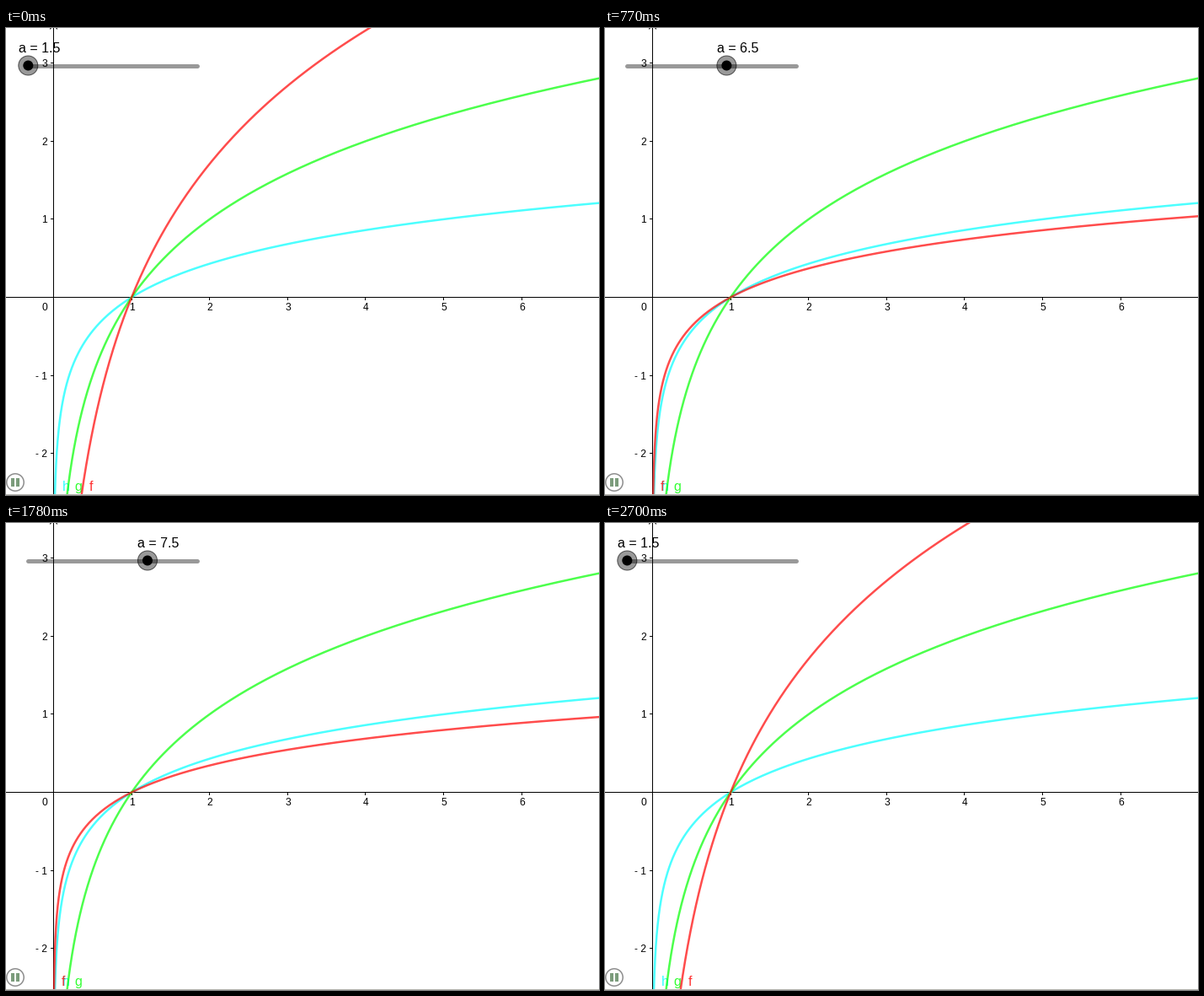
Write a matplotlib script that moves like this. It is 704 px wide and 554 px high and loops after 2.77 s.

```python
import numpy as np
import matplotlib.pyplot as plt
from matplotlib.animation import FuncAnimation
from matplotlib.patches import Circle, Rectangle

W, H, DPI = 704, 554, 64
PT = 72 / DPI               # points per pixel
X0, Y0, UNIT = 56.5, 319.5, 92.6
LOOP, TICK = 2770, 10       # milliseconds
STEPS, STEP_MS, DOWN_AT = 17, 77, 1470
A_MIN, A_STEP = 1.5, 0.5
RAIL_L, RAIL_R, RAIL_Y = 26.3, 227, 44.5

plt.rcParams["font.family"] = "Liberation Sans"
fig = plt.figure(figsize=(W / DPI, H / DPI), dpi=DPI, facecolor="white")
ax = fig.add_axes([0, 0, 1, 1])
ax.set_xlim(0, W)
ax.set_ylim(H, 0)
ax.axis("off")


def rect(x, y, w, h, color="black", z=1):
    ax.add_patch(Rectangle((x, y), w, h, fc=color, lw=0, aa=False, zorder=z))


def label(x, y, s, size, color="black", ha="left", z=2, alpha=1):
    return ax.text(x, y, s, size=size * PT, color=color, ha=ha,
                   va="baseline", zorder=z, alpha=alpha)


def log_curve(a):
    """Pixel points of y = log_a(x), sampled along y."""
    top = min(3.6, np.log(7.1) / np.log(a))
    y = np.linspace(-2.65, top, 240)
    return X0 + UNIT * a ** y, Y0 - UNIT * y


def name_x(a):
    """Left end of a curve's name, beside its lowest visible point."""
    return X0 + UNIT * a ** ((Y0 - 553) / UNIT) + 8.8


def draw_axes():
    rect(56, 0, 1, H)
    rect(0, 319, W, 1)
    ax.plot([52.5, 56.5, 60.5], [1, -4, 1], color="black", lw=PT, zorder=1)
    for n in range(1, 7):
        x = X0 + n * UNIT
        rect(int(x), 320, 1, 3)
        label(x + 0.5, 335, str(n), 12, ha="center")
    for n in (-2, -1, 1, 2, 3):
        y = Y0 - n * UNIT
        rect(53, int(y), 3, 1)
        label(49, int(y) + 4.8, str(n) if n > 0 else f"- {-n}", 12, ha="right")
    label(49, 335, "0", 12, ha="right")
    rect(0, 553, W, 1, "#b4b4ae", z=6)


def draw_pause():
    ax.add_patch(Circle((11, 539), 10.2, fc="white", ec="#8c8c8c",
                        lw=1.5 * PT, zorder=6))
    for x in (6, 12):
        rect(x, 534, 4, 10, "#7c9c7c", z=7)


def add_curve(a, name, color, z):
    line, = ax.plot(*log_curve(a), color=color, alpha=0.7, lw=2.5 * PT,
                    zorder=z)
    text = label(name_x(a), 549, name, 16, color, z=z + 0.5, alpha=0.8)
    return line, text


draw_axes()
draw_pause()
add_curve(5, "h", "#00ffff", 3)
add_curve(2, "g", "#00ff00", 4)
f_line, f_name = add_curve(A_MIN, "f", "#ff0000", 5)

ax.plot([RAIL_L, RAIL_R], [RAIL_Y] * 2, color="black", alpha=0.4, lw=5 * PT,
        solid_capstyle="round", zorder=8)
knob = ax.add_patch(Circle((0, RAIL_Y), 11.5, fc=(0, 0, 0, 0.4),
                           ec=(0, 0, 0, 0.6), lw=PT, zorder=9))
dot = ax.add_patch(Circle((0, RAIL_Y), 6, fc="black", lw=0, zorder=10))
value = label(0, 29, "", 16, z=10)


def step_at(t):
    """Slider step: climbs, rests at the top, then falls back."""
    if t < DOWN_AT:
        return min(STEPS, sum(t >= (STEP_MS * k - 3) // TICK * TICK
                              for k in range(1, STEPS + 1)))
    fallen = sum(t >= DOWN_AT + STEP_MS * k // TICK * TICK
                 for k in range(STEPS))
    return STEPS - fallen


def update(i):
    step = step_at(i * TICK)
    a = A_MIN + A_STEP * step
    x = RAIL_L + (RAIL_R - RAIL_L) * step / STEPS
    f_line.set_data(*log_curve(a))
    f_name.set_x(name_x(a))
    knob.center = dot.center = (x, RAIL_Y)
    value.set_x(x - 11.7)
    value.set_text(f"a = {a:g}")
    return f_line, f_name, knob, dot, value


anim = FuncAnimation(fig, update, frames=LOOP // TICK, interval=TICK,
                     repeat=True, repeat_delay=0)
plt.show()
```
